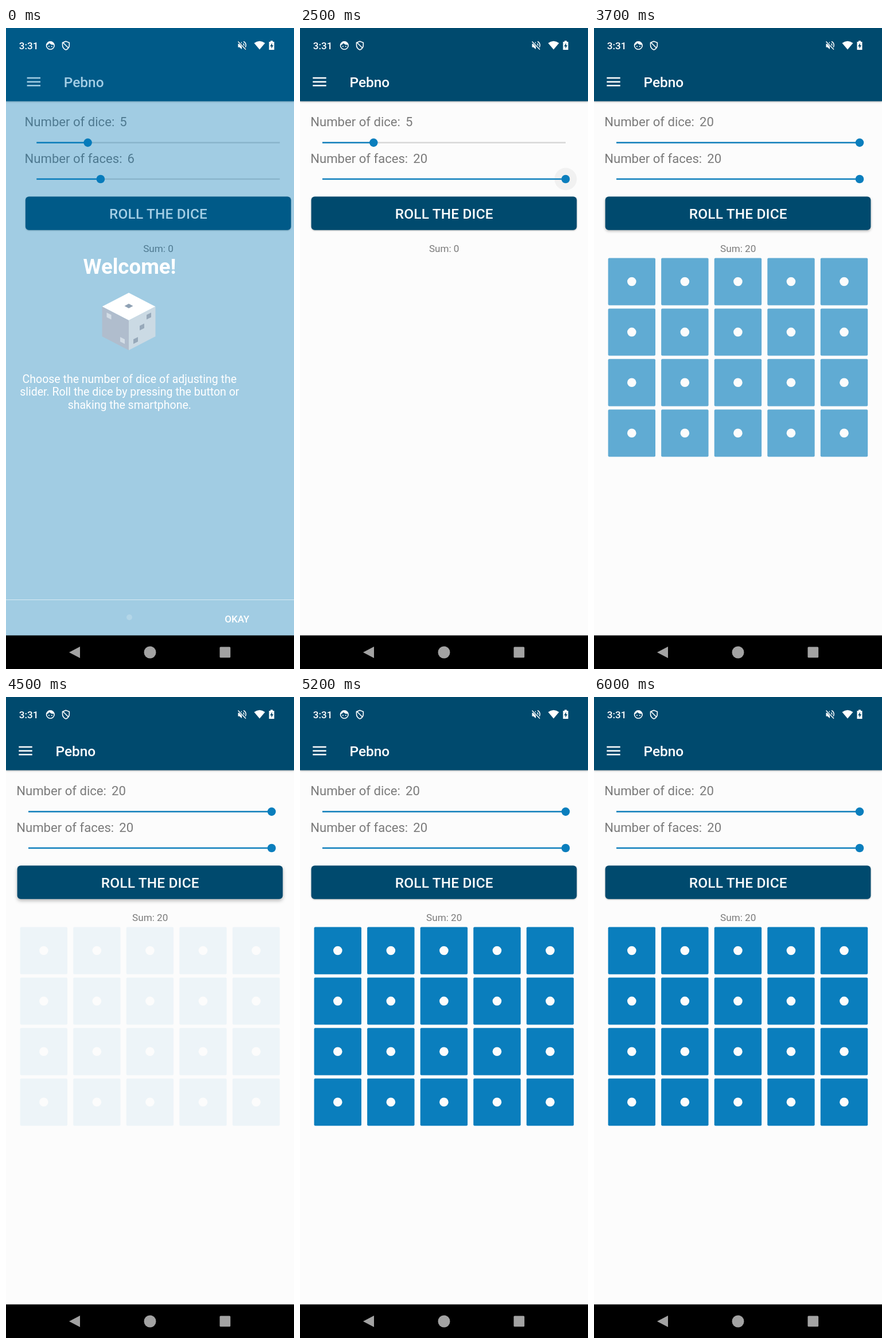
These frames come from a looping animation (502x1116 px, 6.1 s). An HTML page:

```html
<!DOCTYPE html>
<html lang="en">
<head>
<meta charset="utf-8">
<title>Dice roller</title>
<style>
  html, body { margin: 0; width: 100%; height: 100%; overflow: hidden; background: #0078b8; }
  svg { display: block; width: 100vw; height: 100vh; font-family: Roboto, sans-serif; }
  .medium { font-weight: 500; }
  .mid { text-anchor: middle; }
  .label { font-size: 22.1px; fill: #7b7b7b; }
  .blue { fill: #0a7ebd; }
  .navy { fill: #004a6e; }
  #bar { filter: drop-shadow(0 1px 1.5px rgba(0,0,0,.3)); }
</style>
</head>
<body>
<svg viewBox="0 0 502 1116">
  <g id="main">
    <rect width="502" height="1116" fill="#fcfcfc"/>
    <rect id="bar" class="navy" width="502" height="127.5"/>
    <g id="content">
      <path d="M22.3 87H45.7M22.3 93.7H45.7M22.3 100.3H45.7" stroke="#fff" stroke-width="2.4"/>
      <text class="medium" x="86.5" y="103" font-size="24.4" fill="#fff">Pebno</text>
      <text class="label" x="18.3" y="171">Number of dice:</text>
      <text class="label" x="18.3" y="234.5">Number of faces:</text>
      <g id="sliders"></g>
      <rect id="button" class="navy" x="19.6" y="293.4" width="462.8" height="58.4" rx="6"/>
      <text class="medium mid" x="251.3" y="332" font-size="24.4" letter-spacing=".2" fill="#fff">ROLL THE DICE</text>
      <text id="sum" class="mid" x="251.2" y="390" font-size="17.1" fill="#7b7b7b"></text>
      <g id="dice"></g>
    </g>
  </g>

  <g id="intro" fill="#fff">
    <text class="mid" x="215.5" y="428" font-size="36.6" font-weight="700">Welcome!</text>
    <path d="M214 461L260.5 485L214 509L167.5 485Z"/>
    <path d="M167.5 485L214 509V561L167.5 537Z" fill="#b0bdcd"/>
    <path d="M260.5 485L214 509V561L260.5 537Z" fill="#cbdae4"/>
    <path d="M214 480L221.5 484L214 488L206.5 484Z" fill="#8fa1b4"/>
    <g id="pips"></g>
    <g class="mid" font-size="19.5">
      <text x="215.3" y="617.5">Choose the number of dice of adjusting the</text>
      <text x="215.3" y="640.3">slider. Roll the dice by pressing the button or</text>
      <text x="215.3" y="663.2">shaking the smartphone.</text>
    </g>
    <path d="M0 995.5H502" stroke="#fff" stroke-opacity=".6" stroke-width="1.2"/>
    <circle cx="215" cy="1026" r="5" opacity=".2"/>
    <text class="medium mid" x="402.7" y="1034.5" font-size="17">OKAY</text>
  </g>

  <g fill="#fff">
    <text class="medium" x="22.7" y="37" font-size="17.1">3:31</text>
    <circle cx="77.3" cy="30.5" r="6.8" fill="none" stroke="#fff" stroke-width="1.6"/>
    <path d="M70.5 30Q74 29 75.5 26.5Q79 30 84 29A6.8 6.8 0 0 0 70.5 30Z"/>
    <circle cx="74.8" cy="32" r="1"/><circle cx="79.8" cy="32" r="1"/>
    <path d="M104.4 23.2L110.3 25.5V30Q110.3 35.5 104.4 38Q98.500 35.5 98.500 30V25.5ZM99.500 25.500L109 35" fill="none" stroke="#fff" stroke-width="1.6"/>
    <path d="M404.500 27.500H407L411 24V37L407 33.500H404.500Z"/>
    <path d="M413.500 27Q416 30 413.500 33.500M414 23.500Q419 26 418 31.500Q417.500 34 415.500 36" fill="none" stroke="#fff" stroke-width="1.5"/>
    <path d="M405 23.500L418.500 37.500" stroke="#004a6e" stroke-width="3.600"/>
    <path d="M404.500 23.500L418 37.500" stroke="#fff" stroke-width="1.500"/>
    <path d="M432.500 26.300Q442 19 451.500 26.300L442 37.500Z"/>
    <path d="M458.500 24H461V22.300H465V24H467.500V38H458.500Z"/>
    <path class="navy" d="M463.800 26L460.300 32H462.600V36L466 30H463.800Z"/>
  </g>
  <rect y="1057.5" width="502" height="58.5"/>
  <g fill="#a3a3a3">
    <path d="M110 1087L129 1077V1097Z"/>
    <circle cx="251" cy="1087" r="10.5"/>
    <rect x="372.500" y="1077.500" width="18.700" height="18.700" rx="1.500"/>
  </g>
</svg>
<script>
const LOOP = 6100, STEP = 100, FADE = 500;
const ROLLS = [3405, 4425, 5470];
const SLIDERS = [
  { y: 199.6, textX: 184, textY: 171, from: 5, start: 2500 },
  { y: 263, textX: 197.3, textY: 234.5, from: 6, start: 1700 }
];
const $ = id => document.getElementById(id);
const clamp = x => Math.max(0, Math.min(1, x));
const smooth = x => (x = clamp(x), x * x * (3 - 2 * x));

function add(parent, tag, attrs) {
  const el = document.createElementNS('http://www.w3.org/2000/svg', tag);
  for (const key in attrs) el.setAttribute(key, attrs[key]);
  return parent.appendChild(el);
}

for (const s of SLIDERS) {
  const g = $('sliders');
  s.text = add(g, 'text', { class: 'label', x: s.textX, y: s.textY });
  s.ripple = add(g, 'circle', { cy: s.y, r: 19.5, opacity: 0.045 });
  add(g, 'rect', { x: 39, y: s.y - 1.2, width: 424, height: 2.4, fill: '#d6d6d6' });
  s.fill = add(g, 'rect', { class: 'blue', x: 39, y: s.y - 1.2, height: 2.4 });
  s.thumb = add(g, 'circle', { class: 'blue', cy: s.y, r: 7.3 });
}

for (let i = 0; i < 20; i++) {
  const x = 65.8 + i % 5 * 92.55, y = 441.5 + Math.floor(i / 5) * 87.9;
  add($('dice'), 'rect', { class: 'blue', x: x - 41.2, y: y - 41, width: 82.4, height: 82.2, rx: 2 });
  add($('dice'), 'circle', { cx: x, cy: y, r: 7.8, fill: '#fcfcfc' });
}

function pip(x, y, slope, fill) {
  const d = 4 * slope;
  add($('pips'), 'path', { d: `M${x - 4} ${y - 4 - d}l8 ${2 * d}v8l-8 ${-2 * d}z`, fill });
}
for (const [x, y] of [[179.5, 501.5], [203, 544]]) pip(x, y, 0.5, '#d3dde6');
for (const [x, y] of [[249, 501.5], [237, 520.5], [226, 544]]) pip(x, y, -0.5, '#97a9ba');

function draw(t) {
  $('main').style.opacity = clamp(0.64 + t / 200);
  $('intro').style.opacity = clamp(1 - t / 90);
  const shift = t < 400 ? 14.3 * Math.exp(-t / 90) : 0;
  $('content').setAttribute('transform', `translate(${shift} 0)`);

  for (const s of SLIDERS) {
    const value = s.from + Math.round((20 - s.from) * smooth((t - s.start) / 600));
    const x = 39 + 424 * (value - 1) / 19;
    s.text.textContent = value;
    s.fill.setAttribute('width', x - 39);
    s.thumb.setAttribute('cx', x);
    s.ripple.setAttribute('cx', x);
    s.ripple.style.display = t > s.start && t <= s.start + 800 ? '' : 'none';
  }

  const roll = ROLLS.findLast(r => t >= r);
  $('sum').textContent = roll ? 'Sum: 20' : 'Sum: 0';
  $('dice').style.opacity = roll ? 0.5 - 0.5 * Math.cos(Math.PI * clamp((t - roll) / FADE)) : 0;

  const press = ROLLS.findLast(r => t >= r - 50);
  const lift = press ? clamp((press + 450 - t) / 300) : 0;
  $('button').style.filter = `drop-shadow(0 ${1.2 + 2.5 * lift}px ${1.2 + 1.8 * lift}px rgba(0,0,0,.28))`;
}

// The screen refreshes ten times a second.
function tick() {
  draw(Math.floor(performance.now() % LOOP / STEP) * STEP);
  requestAnimationFrame(tick);
}
tick();
</script>
</body>
</html>
```
